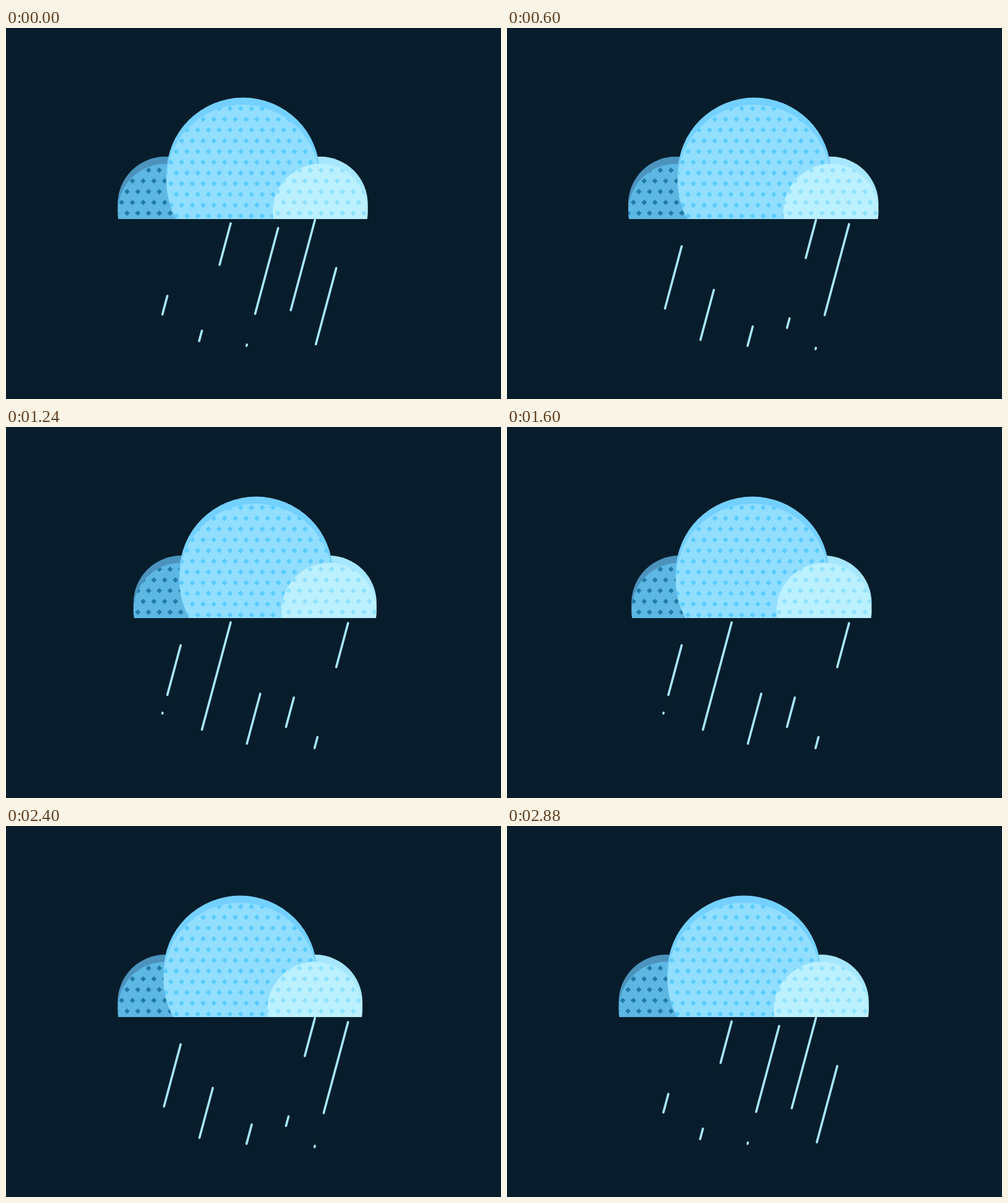
Recreate the animation shown at these times as an HTML page with a canvas. Size 800x600 px, loop 2.92 s.

```html
<!DOCTYPE html>
<html lang="en">
<head>
<meta charset="utf-8">
<title>Rain cloud</title>
<style>
  html, body { margin: 0; width: 100%; height: 100%; overflow: hidden; background: #081d2b; }
  canvas { display: block; width: 800px; height: 600px; }
</style>
</head>
<body>
<canvas id="stage"></canvas>
<script>
const W = 800, H = 600;
const STEP = 40, LOOP = 2920, SWAY = 2880, RAIN = 360, TAIL_LAG = 200;
const FLOOR = 309;      // flat underside of the cloud
const DROP = 11.6;      // how far the body sits below its rim
const GAP = 17.36;      // spacing of the dot grid
const DOT = 4.4;
const SLANT = Math.tan(Math.PI / 12);

const puffs = {
  left:   { x: 269.2, y: 285, r: 76.9, sway: 13.7, peak: 1200, grid: [230.4, 230],
            rim: '#4b93bd', body: '#5db7e3', dots: '#217ba8' },
  middle: { x: 391.9, y: 236.5, r: 124, sway: 13.6, peak: 1040, grid: [388, 147.7],
            rim: '#73d0ff', body: '#91deff', dots: '#5acbff' },
  right:  { x: 512.5, y: 285, r: 76.9, sway: 13.5, peak: 880, grid: [509, 230],
            rim: '#a6e7ff', body: '#bbf0ff', dots: '#8fe1ff' }
};

// top x, top y, bottom y, time shift
const drops = [
  [282.3, 353, 463.3, 0],
  [363.1, 316, 506.2, 80],
  [439.8, 323.6, 514, 160],
  [499.3, 310.5, 485, 200],
  [552.8, 317.2, 519.3, 280]
];

// progress down the path, one value per step
const fall = [0, 0, 0.352, 0.566, 0.728, 0.836, 0.912, 0.961, 0.99, 1];

const canvas = document.getElementById('stage');
const ctx = canvas.getContext('2d');
const scale = window.devicePixelRatio || 1;
canvas.width = W * scale;
canvas.height = H * scale;

function progress(ms) {
  const i = Math.round(ms / STEP);
  return fall[Math.max(0, Math.min(i, fall.length - 1))];
}

function centre(p, t) {
  return p.x + p.sway * Math.cos(2 * Math.PI * (t - p.peak) / SWAY);
}

function disc(x, y, r, colour) {
  ctx.beginPath();
  ctx.arc(x, y, r, 0, 2 * Math.PI);
  ctx.fillStyle = colour;
  ctx.fill();
}

function drawRim(p, t) {
  disc(centre(p, t), p.y, p.r, p.rim);
}

function drawBody(p, t) {
  const x = centre(p, t), y = p.y + DROP;
  ctx.save();
  disc(x, y, p.r, p.body);
  ctx.clip();
  drawDots(p, x, y);
  ctx.restore();
}

// The grid stays still while the body slides across it.
function drawDots(p, x, y) {
  const [gx, gy] = p.grid;
  const reach = p.r + GAP;
  const firstRow = Math.ceil((y - reach - gy) / GAP);
  const lastRow = Math.floor((FLOOR + DOT - gy) / GAP);
  ctx.beginPath();
  for (let row = firstRow; row <= lastRow; row++) {
    const cy = gy + row * GAP;
    const shift = gx + (row & 1) * GAP / 2;
    const first = Math.ceil((x - reach - shift) / GAP);
    const last = Math.floor((x + reach - shift) / GAP);
    for (let col = first; col <= last; col++) {
      const cx = shift + col * GAP;
      ctx.moveTo(cx, cy - DOT);
      ctx.lineTo(cx + DOT, cy);
      ctx.lineTo(cx, cy + DOT);
      ctx.lineTo(cx - DOT, cy);
      ctx.closePath();
    }
  }
  ctx.fillStyle = p.dots;
  ctx.fill();
}

function drawCloud(t) {
  const { left, middle, right } = puffs;
  ctx.save();
  ctx.beginPath();
  ctx.rect(0, 0, W, FLOOR);
  ctx.clip();
  drawRim(left, t);
  drawBody(left, t);
  drawRim(right, t);
  drawRim(middle, t);
  drawBody(middle, t);
  drawBody(right, t);
  ctx.restore();
}

function drawRain(t) {
  ctx.strokeStyle = '#a6e7ff';
  ctx.lineWidth = 3.6;
  ctx.lineCap = 'round';
  ctx.beginPath();
  for (const [x, top, bottom, shift] of drops) {
    const age = (t + shift) % RAIN;
    for (const a of [age, age + RAIN]) {
      const head = progress(a) * (bottom - top);
      const tail = progress(a - TAIL_LAG) * (bottom - top);
      if (head <= tail) continue;
      ctx.moveTo(x - tail * SLANT, top + tail);
      ctx.lineTo(x - head * SLANT, top + head);
    }
  }
  ctx.stroke();
}

function draw(t) {
  ctx.setTransform(scale, 0, 0, scale, 0, 0);
  ctx.fillStyle = '#081d2b';
  ctx.fillRect(0, 0, W, H);
  drawCloud(t);
  drawRain(t);
}

const start = performance.now();
function tick() {
  const t = (performance.now() - start) % LOOP;
  draw(Math.floor(t / STEP) * STEP);
  requestAnimationFrame(tick);
}
tick();
</script>
</body>
</html>
```
